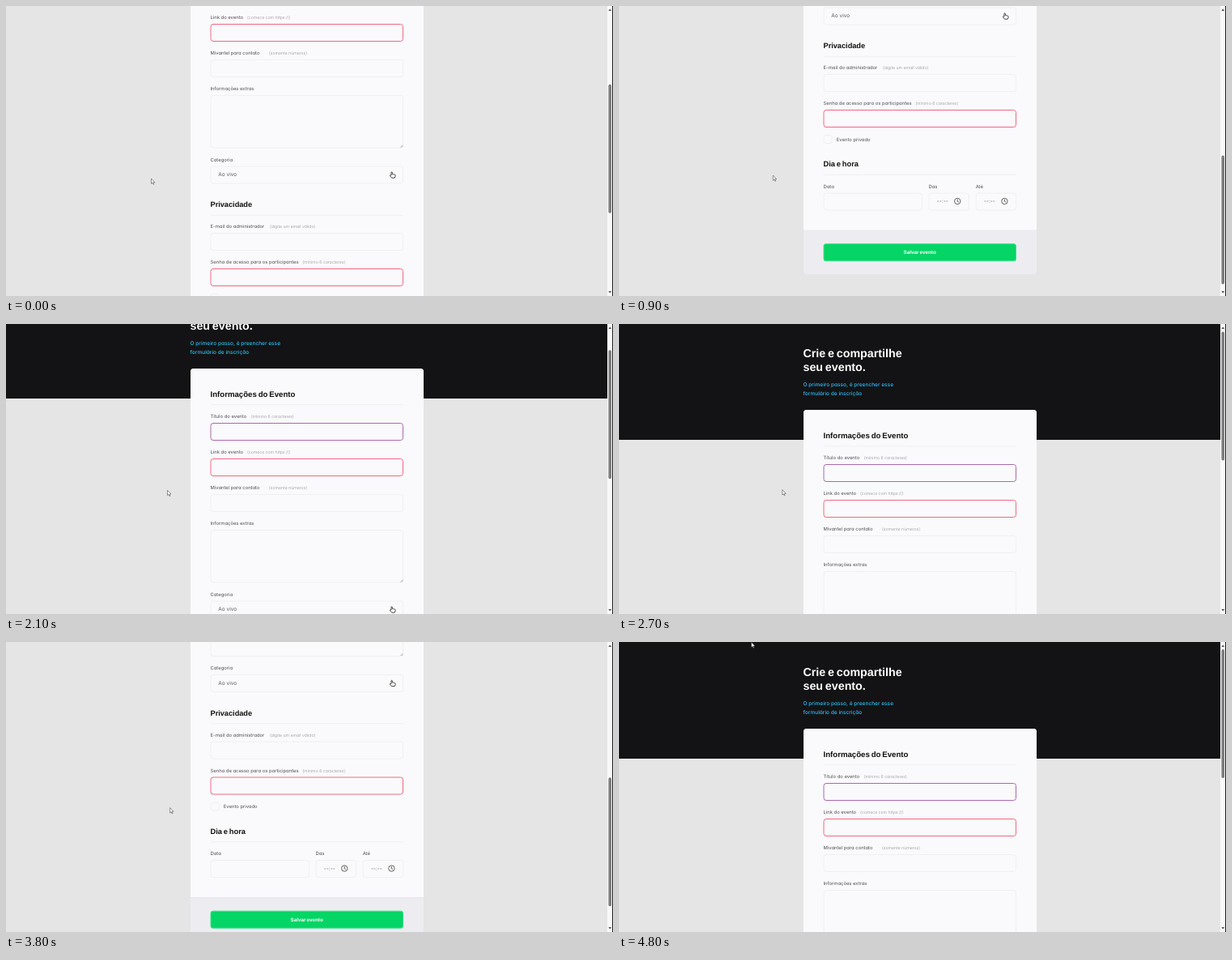
An HTML page that plays this animation: 750x358 px, repeating every 4.9 s.

```html
<!DOCTYPE html>
<html lang="pt-BR">
<head>
<meta charset="utf-8">
<title>Formulário de evento</title>
<style>
  html, body { margin: 0; width: 100%; height: 100%; overflow: hidden; background: #e5e5e5; }
  svg { display: block; width: 750px; height: 358px; }
  text { font-family: Inter, "Open Sans", sans-serif; font-feature-settings: "cv11"; text-rendering: geometricPrecision; white-space: pre; }
  .title, .head, .save { font-family: "Liberation Sans", Arial, sans-serif; font-weight: bold; word-spacing: -.08em; }
  .title { font-size: 14.25px; fill: #fff; }
  .head { fill: #111; }
  .save { font-size: 6.25px; fill: #fff; text-anchor: middle; }
  .lead { font-size: 6.55px; font-weight: 500; fill: #2fbcf4; }
  .label { font-size: 5.87px; fill: #505055; }
  .hint { font-size: 5.2px; font-weight: 300; fill: #8f8f96; }
  .value { font-size: 6.5px; fill: #5c5c61; }
</style>
</head>
<body>
<svg viewBox="0 0 750 358">
  <rect width="750" height="358" fill="#e5e5e5"/>
  <g id="page"></g>
  <g id="bar">
    <rect x="743" width="6" height="358" fill="#f9f9f9"/>
    <rect x="749" width="1" height="358" fill="#222"/>
    <path d="M744.3 6l1.9-2.6L748.1 6zM744.3 352l1.9 2.6 1.9-2.6z" fill="#555"/>
    <rect id="thumb" x="744.4" y="9" width="3.6" height="159" rx="1.8" fill="#7d7d7d"/>
  </g>
  <path id="cursor" d="M0 0V6.4L1.5 5.1 2.5 7.3 3.4 6.9 2.4 4.7H4.4Z" fill="#fff" stroke="#333" stroke-width=".5"/>
</svg>
<script>
const LOOP = 4900, STEP = 100;
const RED = '#ee6a80', PURPLE = '#a969b0', PALE = '#f0f0f3';
const $ = id => document.getElementById(id);

const rect = (x, y, w, h, fill, rest = '') =>
  `<rect x="${x}" y="${y}" width="${w}" height="${h}" fill="${fill}" ${rest}/>`;
const text = (cls, x, y, s, size) =>
  `<text class="${cls}" x="${x}" y="${y}"${size ? ` style="font-size:${size}px"` : ''}>${s}</text>`;
const box = (x, y, w, h, color = PALE) =>
  rect(x + .5, y + .5, w - 1, h - 1, '#fafafc', `rx="3" stroke="${color}"`);
const label = (y, s, hintX, hint) =>
  text('label', 252.5, y, s) + (hint ? text('hint', hintX, y, `(${hint})`) : '');
const section = (y, s, size) =>
  text('head', 252.5, y, s, size) + rect(252.5, y + 9.3, 238.5, 1, PALE);
const clock = x =>
  `<g fill="none" stroke="#333" stroke-width=".75"><circle cx="${x}" cy="633" r="3.7"/><path d="M${x} 630.6v2.6l1.7 1"/></g>`;
const time = (x, name) =>
  text('label', x, 616.5, name) + box(x, 622.5, 50.5, 22) +
  text('value', x + 10.3, 635, '--:--') + clock(x + 35.7);

const hand = `<path transform="translate(474 400.7) scale(1 .86)" fill="#fff" stroke="#222" stroke-width=".9" stroke-linejoin="round"
  d="M2 5V.9Q2 .2 2.6 .2T3.3 .9V3.3Q4.2 2.9 4.6 3.6 5.5 3.2 5.9 4 7 3.9 7 4.9V6.6L6.2 8.7H2.6L.5 5.8Q.1 5 .8 4.7 1.4 4.5 2 5.2Z"/>`;

$('page').innerHTML = [
  rect(0, -2, 743, 146, '#131315'),
  text('title', 227.5, 42, 'Crie e compartilhe'),
  text('title', 227.5, 58.7, 'seu evento.'),
  text('lead', 227.5, 78.4, 'O primeiro passo, é preencher esse'),
  text('lead', 227.5, 88.6, 'formulário de inscrição'),

  rect(228, 107, 288, 616, '#ededf1', 'rx="4"'),
  '<path d="M228 669V111q0-4 4-4h280q4 0 4 4v558z" fill="#fafafc"/>',
  rect(228, 668.6, 288, .8, '#e5e5e9'),

  section(142, 'Informações do Evento', 9.65),
  label(168.1, 'Título do evento', 302.7, 'mínimo 6 caracteres'),
  box(252.5, 174, 238.5, 22, PURPLE),
  label(212.1, 'Link do evento', 298, 'comece com https://'),
  box(252.5, 218, 238.5, 22, RED),
  label(256.1, 'Mivantel para contato', 325, 'somente números'),
  box(252.5, 262, 238.5, 22),
  label(300, 'Informações extras'),
  box(252.5, 306, 238.5, 65.5),
  '<path d="M487.3 370.6l3-3M489 370.6l1.3-1.3" stroke="#888" stroke-width=".6"/>',
  label(387.7, 'Categoria'),
  box(252.5, 393.5, 238.5, 22),
  text('value', 262.3, 406.4, 'Ao vivo'),
  hand,

  section(444.4, 'Privacidade', 9.2),
  label(470.2, 'E-mail do administrador', 326, 'digite um email válido'),
  box(252.5, 476, 238.5, 22),
  label(514.2, 'Senha de acesso para os participantes', 366.3, 'mínimo 6 caracteres'),
  box(252.5, 520, 238.5, 22, RED),
  box(252.5, 551, 11, 11),
  text('label', 268.8, 558.5, 'Evento privado'),

  section(590.4, 'Dia e hora', 9.3),
  label(616.5, 'Data'),
  box(252.5, 622.5, 122.5, 22),
  time(382.5, 'Das'),
  time(440.7, 'Até'),

  rect(253, 685.7, 237.5, 21, '#05d565', 'rx="2.5" stroke="#3fe08a"'),
  text('save', 371.7, 698.3, 'Salvar evento')
].join('');

const smooth = p => p * p * (3 - 2 * p);
const quadOut = p => 1 - (1 - p) ** 2;
const sineOut = p => Math.sin(p * Math.PI / 2);

// start, end, from, to, easing
const scrolls = [
  [0, 800, 196, 392, smooth],
  [1200, 1500, 392, 402.5, quadOut],
  [1600, 2380, 402.5, 0, quadOut],
  [2683, 3260, 0, 402.5, smooth],
  [3745, 4450, 402.5, 0, sineOut]
];
// time, x, y
const moves = [
  [0, 179.5, 213], [600, 186.5, 210.5], [900, 190.3, 209], [1300, 190.3, 209],
  [1500, 197.5, 205.3], [2100, 199.5, 205.3], [2400, 201.8, 204.6], [2700, 201.8, 204.6],
  [3300, 202.6, 204.6], [4300, 202.6, 204.6], [4600, 163.6, 2], [4700, 163.6, 2], [4800, 163.6, .2]
];

function scrollAt(t) {
  const [a, b, from, to, ease] = scrolls.filter(s => s[0] <= t).pop();
  return from + (to - from) * ease(Math.min(1, (t - a) / (b - a)));
}

function cursorAt(t) {
  const i = moves.findIndex(m => m[0] > t);
  if (i < 0) return moves[moves.length - 1].slice(1);
  const a = moves[i - 1], b = moves[i], p = (t - a[0]) / (b[0] - a[0]);
  return [1, 2].map(k => a[k] + (b[k] - a[k]) * p);
}

function draw(ms) {
  const t = Math.floor(ms % LOOP / STEP) * STEP;
  const y = scrollAt(t);
  $('page').setAttribute('transform', `translate(0 ${-Math.round(y * 2) / 2})`);
  $('thumb').setAttribute('y', 9 + y * .448);
  $('cursor').setAttribute('transform', `translate(${cursorAt(t)})`);
}

const start = performance.now();
function tick() {
  draw(performance.now() - start);
  requestAnimationFrame(tick);
}
tick();
</script>
</body>
</html>
```
